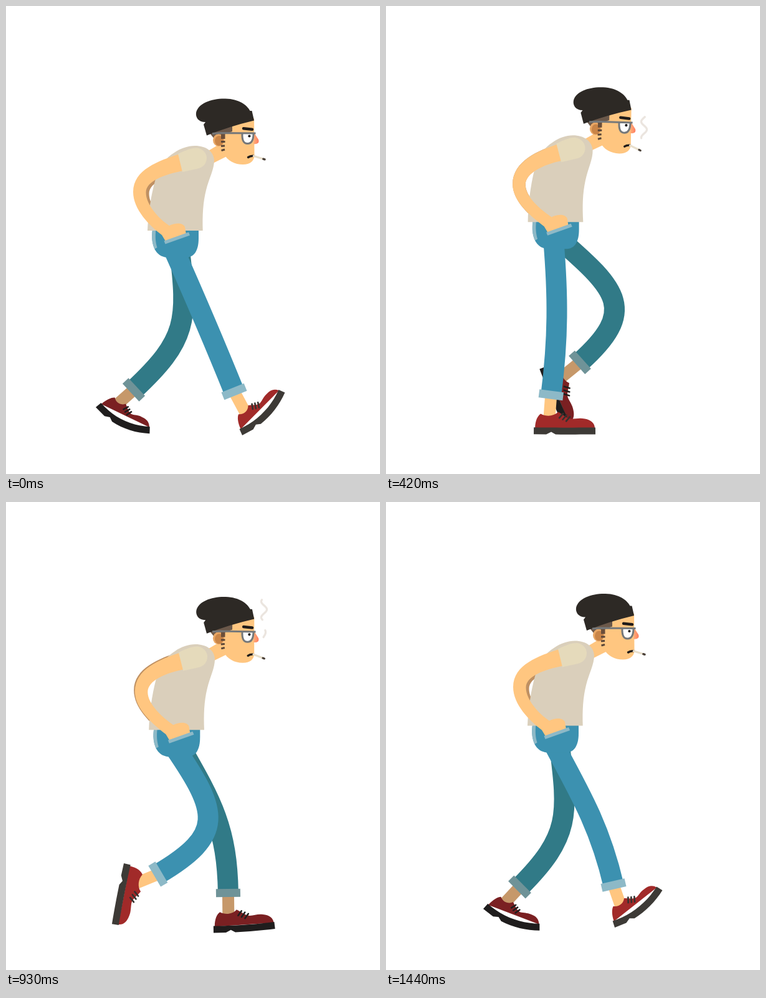
Animation, 600 px wide and 750 px high, one loop 1.47 s. Source, as an HTML page with a canvas:

```html
<!DOCTYPE html>
<html lang="en">
<head>
<meta charset="utf-8">
<title>Walk cycle</title>
<style>
  html, body { margin: 0; width: 100%; height: 100%; overflow: hidden; background: #fff; }
  canvas { display: block; }
</style>
</head>
<body>
<canvas id="stage" width="600" height="750"></canvas>
<script>
const ctx = document.getElementById('stage').getContext('2d');
const LOOP = 1470, STEP = LOOP / 2, TICK = 30;
const RAD = Math.PI / 180;
const HIP = [268, 388], FAR_SHIFT = 10, SHOE = 99;

const NEAR = { jeans: '#3c91b0', cuff: '#8db9c7', skin: '#ffc680', shoe: '#a12a29', sole: '#3d3a36', lace: '#35322f' };
const FAR = { jeans: '#317a87', cuff: '#6f9398', skin: '#c6986a', shoe: '#7a2022', sole: '#1f1d1d', lace: '#1f1d1d' };

// time, cuff x, cuff y, cuff angle, thigh angle, heel x, heel y, heel angle, toe angle
const LEG = [
  [0, 366, 618, 68, 66, 379, 688, -24, -66],
  [75, 365, 622, 76, 60, 359, 689, -9, -42],
  [240, 333, 627, 94, 62, 306, 690, 0, 0],
  [315, 302, 626, 102, 66, 272, 687, 0, 0],
  [495, 244.5, 621, 96, 95, 216, 684, 4, -1],
  [630, 224, 617, 119, 83, 178.5, 669, 20, -2],
  [705, 204.5, 617, 135, 83, 146, 652, 42, 0],
  [735, 195, 615, 137, 83, 134, 643, 50, 2],
  [810, 201.5, 597, 153, 70, 133.5, 602, 72, 47],
  [975, 258.5, 594, 147, 52, 206, 575, 106, 106],
  [1050, 273, 579, 147.5, 48, 213.5, 567, 96, 96],
  [1230, 323, 573, 127, 38, 264, 604, 44, 33],
  [1365, 361, 590, 102, 42, 341.5, 658, -10, -42],
  [1440, 365, 614, 77, 61.5, 367, 682, -18, -58]
];

// time, x, y, lean
const BODY = [
  [0, 0, 0, 0], [75, 1, 3, -0.05], [240, 2.3, 3, 0.65], [315, 1.5, -6, 0.9],
  [495, 0.2, -16, 1], [630, 0, -12.5, 0.2], [705, 0, -1.5, 0]
];

// time, top, bottom, wave offset (heights measured from the top of the hat)
const SMOKE = [
  [90, 98, 98, 81], [240, 74.5, 95, 81], [630, 23, 62, 81], [810, 10, 48, 81],
  [1050, 1.5, 26.5, 88], [1230, -7, 7, 88], [1330, -12, -10, 88]
];
const PUFF = [
  [600, 92, 92, 70], [630, 85, 88, 70], [810, 65.5, 77, 70],
  [1050, 43.5, 52.5, 70], [1230, 27, 30, 70], [1290, 22, 22, 70]
];

// Smooth periodic interpolation through rows of [time, ...values].
function sample(rows, time, period) {
  const n = rows.length;
  const t = ((time % period) + period) % period;
  let i = n - 1;
  while (i > 0 && rows[i][0] > t) i--;
  const row = k => rows[(k + n) % n];
  const at = k => row(k)[0] + Math.floor(k / n) * period;
  const span = at(i + 1) - at(i);
  const s = (t - at(i)) / span;
  const slope = (k, c) => (row(k + 1)[c] - row(k)[c]) / (at(k + 1) - at(k));
  const tangent = (k, c) => {
    const before = at(k) - at(k - 1), after = at(k + 1) - at(k);
    return (slope(k - 1, c) * after + slope(k, c) * before) / (before + after);
  };
  return rows[0].slice(1).map((_, j) => {
    const c = j + 1;
    return (2 * s ** 3 - 3 * s * s + 1) * row(i)[c] + (3 * s * s - 2 * s ** 3) * row(i + 1)[c] +
      span * ((s ** 3 - 2 * s * s + s) * tangent(i, c) + (s ** 3 - s * s) * tangent(i + 1, c));
  });
}

function fill(path, color) {
  ctx.fillStyle = color;
  ctx.fill(new Path2D(path));
}

function stroke(path, color, width, cap = 'butt') {
  ctx.strokeStyle = color;
  ctx.lineWidth = width;
  ctx.lineCap = cap;
  ctx.lineJoin = 'round';
  ctx.stroke(new Path2D(path));
}

function group(draw) {
  ctx.save();
  draw();
  ctx.restore();
}

// Maps shoe coordinates (along the sole, above it) onto a sole bent into an arc.
function bentSole(x, y, heel, toe) {
  const curl = (toe - heel) * RAD / SHOE || 1e-7;
  const a = heel * RAD;
  return (u, v) => {
    const q = a + curl * u;
    return [
      x + (Math.sin(q) - Math.sin(a)) / curl + v * Math.sin(q),
      y + (Math.cos(a) - Math.cos(q)) / curl - v * Math.cos(q)
    ];
  };
}

function drawShoe(at, c) {
  const curve = (...p) => 'C' + [at(p[0], p[1]), at(p[2], p[3]), at(p[4], p[5])].join(' ');
  fill('M' + at(2, 10) + curve(2, 22, 6, 30, 11, 33) + curve(20, 28, 32, 29, 39, 36) +
    curve(47, 32, 52, 26, 60, 25) + curve(68, 25, 74, 27, 82, 25) +
    curve(92, 23, 98, 18, 98, 10) + 'Z', c.shoe);

  const rim = [at(0, 0), at(20, 0), at(28, 4), at(35, 0)];
  for (let u = 43; u <= SHOE; u += 8) rim.push(at(u, 0));
  for (let u = SHOE; u >= 0; u -= 9) rim.push(at(u, 11));
  fill('M' + rim.join('L') + 'Z', c.sole);

  for (let i = 0; i < 3; i++) {
    const u = 44 + 5.5 * i, v = 30 - 2.6 * i;
    stroke('M' + at(u - 3, v - 3.5) + 'L' + at(u + 3, v + 3.5), c.lace, 2.6, 'round');
  }
}

function drawLeg(time, body, c, shift) {
  const [cx, cy, cuffAngle, thighAngle, hx, hy, heel, toe] = sample(LEG, time, LOOP);
  const ex = cx + shift;
  const sx = HIP[0] + body.x + shift, sy = HIP[1] + body.y;
  const end = cuffAngle * RAD, start = thighAngle * RAD;
  const reach = Math.hypot(ex - sx, cy - sy) * (0.33 + 0.003 * Math.abs(cuffAngle - thighAngle));
  const at = bentSole(hx + shift, hy, heel, toe);

  stroke(`M${ex} ${cy}L${at(25, 29)}`, c.skin, 19, 'round');
  drawShoe(at, c);
  stroke(`M${sx} ${sy}C${sx + reach * Math.cos(start)} ${sy + reach * Math.sin(start)} ` +
    `${ex - reach * Math.cos(end)} ${cy - reach * Math.sin(end)} ${ex} ${cy}`, c.jeans, 33);
  group(() => {
    ctx.translate(ex, cy);
    ctx.rotate(end);
    ctx.fillStyle = c.cuff;
    ctx.fillRect(-6.5, -19.5, 13, 39);
  });
}

function drawArm(color, lean, hand) {
  const s = -2.7 * lean, sy = -2 * lean;
  const e = 0.4 * hand - 2.5 * lean, ey = 1.5 * lean;
  const h = hand;
  fill(`M${279 + s} ${237 + sy}C${245 + s} ${248 + sy} ${204 + e} ${262 + ey} ${204 + e} ${298 + ey}` +
    `C${204 + e} ${326 + ey} ${230 + h} 352 ${250 + h} 367L${256 + h} 377L${289 + h} 366L${287 + h} 354` +
    `C${283 + h} 346 ${270 + h} 348 ${262 + h} 352C${245 + h} 341 ${224.5 + e} ${318 + ey} ${224.5 + e} ${299 + ey}` +
    `C${224.5 + e} ${280 + ey} ${255 + s} ${270 + sy} ${284 + s} ${264 + sy}Z`, color);
}

function drawHead(lean) {
  ctx.translate(350 - 5.2 * lean, 210 - 4 * lean);
  ctx.rotate(1.2 * lean * RAD);
  ctx.translate(-350, -210);

  fill('M318 236L348 218L360 238L330 253Z', NEAR.skin);
  fill('M345 195L398 180L398.5 240C398 248 392 254 380 254C367 254 355 248 349 236L345 222Z', NEAR.skin);
  const blush = ctx.createLinearGradient(397, 0, 406, 0);
  blush.addColorStop(0, '#ffb078');
  blush.addColorStop(1, '#ff7a60');
  fill('M398 203L405 214C407 219 403 222 397 221Z', blush);

  fill('M327 204L363 190L363 201L346 207L335 214Z', '#6b584a');
  fill('M332 215a9 10 0 1 1 18 0a9 10 0 1 1 -18 0', '#e9a765');
  fill('M335 216a7 8 0 1 1 14 0a7 8 0 1 1 -14 0', '#c98548');
  fill('M345 203H351.5V213H345Z', '#6b4f3a');
  stroke('M345 217.5H351.5M345 224.5L351 224M345.5 231.5L351 230', '#5a4638', 3);

  fill('M320 186C308 186 304 178 305 171C308 156 330 148 352 148.5C374 149 387 159 391.5 168' +
    'L394.5 168L398 183.5Q358 193 322 207.5L317 190Z', '#2d2925');

  fill('M379 204H397.5C398 215 394 220.5 387.5 220.5C381 220.5 378.5 215 379 204Z', '#fff');
  stroke('M379 204C378.5 215 381 220.5 387.5 220.5C394 220.5 397 215 397 204', '#75787a', 3);
  stroke('M331 204.5L345 203.5L400.5 204', '#75787a', 3);
  fill('M388.3 208.5a2.1 2.1 0 1 1 4.2 0a2.1 2.1 0 1 1 -4.2 0', '#1d1a18');
  stroke('M381 196.3L395 197.7', '#1f1b19', 4.4, 'round');

  stroke('M388.5 242.5Q392 240 397 240.3', '#1f1b19', 3.4, 'round');
  ctx.translate(396, 240);
  ctx.rotate((17 + 7 * lean) * RAD);
  stroke('M0 0H18', '#e8dfcc', 3.2);
  stroke('M17.5 0H20', '#4a4038', 3.2, 'round');
}

function drawSmoke(rows, time, hatTop, amp) {
  if (time < rows[0][0] || time > rows[rows.length - 1][0]) return;
  const [top, bottom, offset] = sample(rows, time, LOOP);
  const points = [];
  for (let y = top; y <= bottom; y++) {
    points.push([414 - amp * Math.cos((y - offset) / 25.5 * 2 * Math.PI), hatTop + y]);
  }
  if (points.length > 1) stroke('M' + points.join('L'), '#ebe5df', 3.3, 'round');
}

function drawScene(time) {
  const [x, y, lean] = sample(BODY, time, STEP);
  const body = { x, y };
  const hand = 2.5 * (1 - Math.cos(time / LOOP * 2 * Math.PI));
  const inBody = draw => group(() => {
    ctx.translate(x, y);
    draw();
  });
  // Leans the upper body while the hem stays level.
  const leaning = draw => group(() => {
    ctx.translate(0, 360);
    ctx.transform(1, 0, 5.2 * lean / 212, 1 + 4 * lean / 212, 0, 0);
    ctx.translate(0, -360);
    draw();
  });

  ctx.fillStyle = '#fff';
  ctx.fillRect(0, 0, 600, 750);

  inBody(() => {
    ctx.translate(5 - 1.2 * hand, 2 - 0.9 * hand);
    drawArm('#bf9062', lean, 0);
  });
  drawLeg(time + STEP, body, FAR, FAR_SHIFT);
  drawLeg(time, body, NEAR, 0);

  inBody(() => {
    fill('M235 358H309V372C309 392 302 402 290 403H258C240 401 232 385 235 358Z', NEAR.jeans);
    fill('M235 358H240.5C239 370 240 379 242.5 387L238.5 389.5C234 380 233 370 235 358Z', NEAR.cuff);
    group(() => drawHead(lean));
    leaning(() => fill('M227 360C228 335 232 305 240 277C245 256 257 243 270 235' +
      'C280 228 292 224 303 224C321 224 333 233 334 247C334 262 326 275 321 295' +
      'C316 315 315 335 315.7 360Z', '#dacfbb'));
    drawArm(NEAR.skin, lean, hand);
    leaning(() => fill('M276 237C290 230 300 227 307 227.5C316 229 322 236 322 243' +
      'C322 252 317 259 306 261L283 266Z', '#e5dabb'));
    ctx.translate(hand, 0);
    fill('M253.5 376.5L293 362.5L295 367.5L255.5 381.5Z', NEAR.cuff);
  });

  const hatTop = 148 + y - 4 * lean;
  drawSmoke(SMOKE, time, hatTop, 4.5);
  drawSmoke(PUFF, time, hatTop, 2.5);
}

const begin = performance.now();
function frame() {
  const elapsed = Math.max(0, performance.now() - begin) % LOOP;
  drawScene(Math.floor(elapsed / TICK) * TICK);
  requestAnimationFrame(frame);
}
frame();
</script>
</body>
</html>
```
